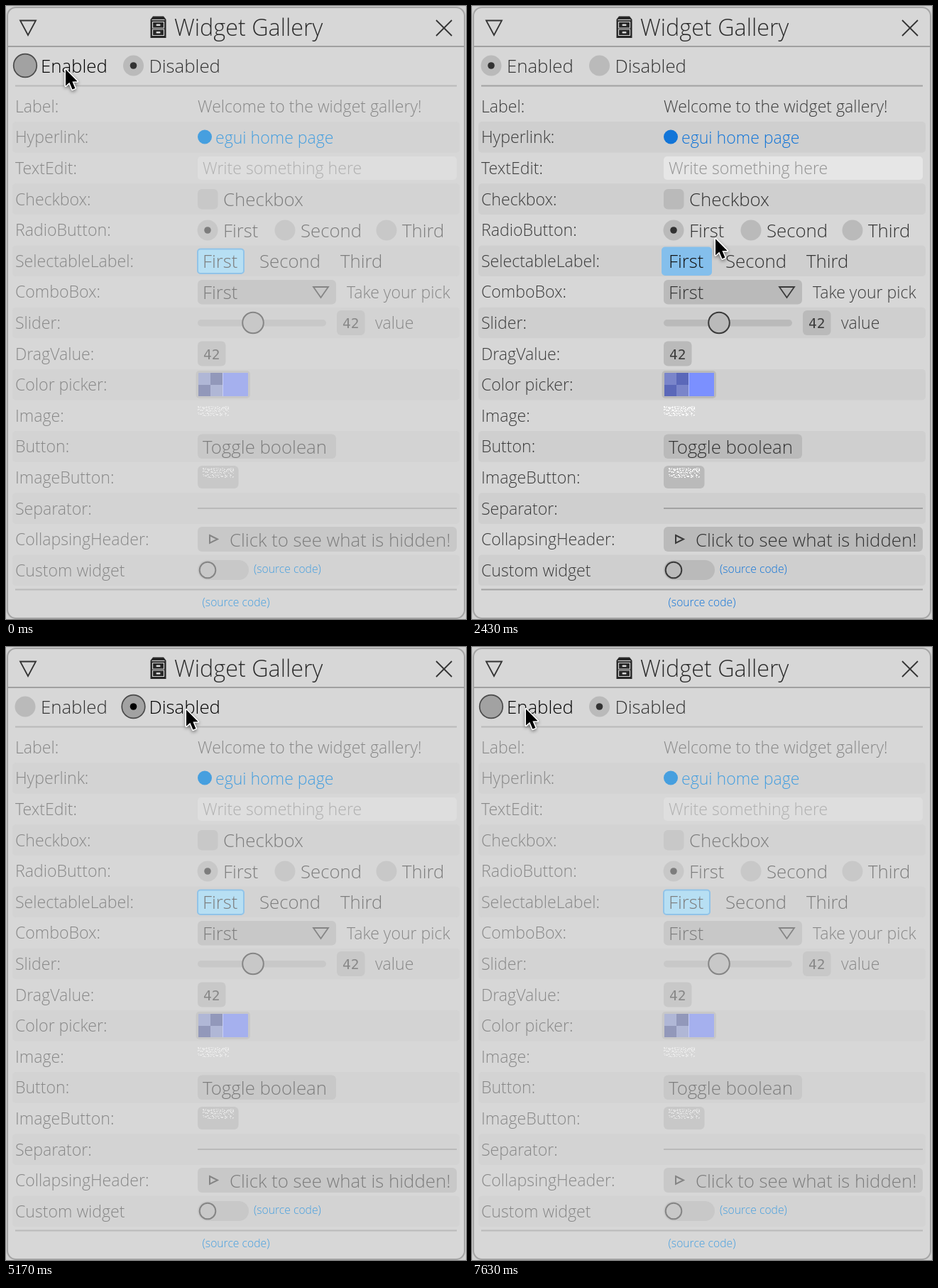
These frames come from a looping animation (648x864 px, 7830 ms). An HTML page with a canvas:

```html
<!DOCTYPE html>
<html lang="en">
<head>
<meta charset="utf-8">
<title>Widget Gallery</title>
<style>
  html, body { margin: 0; width: 100%; height: 100%; overflow: hidden; background: #d0d0d0; }
  canvas { display: block; width: 648px; height: 864px; }
</style>
</head>
<body>
<canvas id="stage" width="648" height="864"></canvas>
<script>
const ctx = document.getElementById('stage').getContext('2d');
const LOOP = 7830, HOVER_LAG = 50;
const ENABLE_AT = 700, DISABLE_AT = 4600, PRESS = 170;
const ROW_TOP = 119.5, ROW_H = 43.6;

const LABELS = ['Label', 'Hyperlink', 'TextEdit', 'Checkbox', 'RadioButton', 'SelectableLabel',
  'ComboBox', 'Slider', 'DragValue', 'Color picker', 'Image', 'Button', 'ImageButton',
  'Separator', 'CollapsingHeader'].map(s => s + ':').concat('Custom widget');

const THEMES = {
  on: { text: '#3c3c3c', strong: '#323232', hint: '#929292', link: '#1275d8', fill: '#bababa',
    stripe: '#cfcfcf', edit: '#e6e6e6', line: '#a2a2a2', stroke: '#3a3a3a',
    select: '#84bfec', selectLine: '#84bfec', dark: '#5b68b9', light: '#7a85ca', color: '#7b90ff', speck: 0.9 },
  off: { text: '#888', strong: '#7d7d7d', hint: '#b0b0b0', link: '#469fdf', fill: '#c8c8c8',
    stripe: '#d3d3d3', edit: '#dedede', line: '#bababa', stroke: '#858585',
    select: '#b7dff3', selectLine: '#91c3e8', dark: '#9298ba', light: '#b0b7d6', color: '#a5b0ee', speck: 0.5 }
};
const HOT = { fill: '#a2a2a2', stroke: '#4a4a4a', text: '#000' };

// time, x, y of the pointer tip
const PATH = [
  [0, 83, 88], [200, 87, 82], [700, 87, 82], [1000, 93, 120], [1250, 99, 180], [1490, 116, 245],
  [1530, 126, 258], [1750, 200, 340], [1970, 270, 392], [2150, 308, 400], [2300, 329, 380],
  [2430, 342, 327], [2750, 336, 240], [3070, 326, 177], [3200, 324, 152], [3500, 300, 115],
  [3850, 262, 92], [4200, 253, 87], [5170, 253, 87], [5400, 290, 130], [5700, 368, 174],
  [5950, 358, 260], [6230, 319, 351], [6450, 264, 375], [6650, 205, 350], [7000, 120, 235],
  [7300, 77, 112], [7420, 73, 90], [7630, 75, 86], [LOOP, 75, 86]
];

// Prefer a family that really has a light weight.
function pickFamily() {
  const width = font => { ctx.font = font; return ctx.measureText('Widget gallery demo').width; };
  return ['"Noto Sans"', '"Open Sans"'].find(f => width(`300 90px ${f}`) !== width(`400 90px ${f}`)) || '"Open Sans"';
}
const FAMILY = pickFamily();
const font = size => `340 ${size}px ${FAMILY}, sans-serif`;
const FONTS = { small: font(15.7), body: font(23.1), button: font(25.8), heading: font(32.3),
  mono: '19.5px "DejaVu Sans Mono", monospace' };
const DROP = { small: 5.5, body: 8.5, button: 9.5, heading: 11.5, mono: 7.5 };

let theme, pointer, enabled;

function slope(i, axis) {
  const a = PATH[i - 1], b = PATH[i], c = PATH[i + 1];
  if (!a || !c || (a[1] === b[1] && a[2] === b[2]) || (b[1] === c[1] && b[2] === c[2])) return 0;
  return (c[axis] - a[axis]) / (c[0] - a[0]);
}

function pointerAt(t) {
  t = (t + LOOP) % LOOP;
  const i = PATH.findIndex((p, n) => n + 1 < PATH.length && t < PATH[n + 1][0]);
  const a = PATH[i], b = PATH[i + 1], span = b[0] - a[0], u = (t - a[0]) / span;
  return [1, 2].map(k => {
    const m0 = slope(i, k) * span, m1 = slope(i + 1, k) * span;
    return a[k] + u * (m0 + u * (3 * (b[k] - a[k]) - 2 * m0 - m1 + u * (2 * (a[k] - b[k]) + m0 + m1)));
  });
}

const over = (x, y, w, h) =>
  pointer[0] > x - 7 && pointer[0] < x + w + 7 && pointer[1] > y - 3 && pointer[1] < y + h + 3;
const hot = (...rect) => enabled && over(...rect);

function paint(fill, stroke, width = 2) {
  if (fill) { ctx.fillStyle = fill; ctx.fill(); }
  if (stroke) { ctx.strokeStyle = stroke; ctx.lineWidth = width; ctx.stroke(); }
}
function rect(x, y, w, h, r, fill, stroke, width) {
  ctx.beginPath();
  ctx.roundRect(x, y, w, h, r);
  paint(fill, stroke, width);
}
function circle(x, y, r, fill, stroke, width) {
  ctx.beginPath();
  ctx.arc(x, y, r, 0, Math.PI * 2);
  paint(fill, stroke, width);
}
function poly(points, fill, stroke, width) {
  ctx.beginPath();
  points.forEach(([x, y]) => ctx.lineTo(x, y));
  ctx.closePath();
  paint(fill, stroke, width);
}
function line(x1, y1, x2, y2, color, width = 2) {
  ctx.beginPath();
  ctx.moveTo(x1, y1);
  ctx.lineTo(x2, y2);
  paint(null, color, width);
}
function text(s, x, y, style, color, align = 'left') {
  ctx.font = FONTS[style];
  ctx.textAlign = align;
  ctx.fillStyle = color;
  ctx.fillText(s, x, y + DROP[style]);
}

function box(x, y, w, h, isHot) {
  if (isHot) rect(x - 1, y - 1, w + 2, h + 2, 7, HOT.fill, HOT.stroke);
  else rect(x, y, w, h, 6, theme.fill);
}

function radio(x, y, label, colors, selected, isHot, pressed) {
  if (pressed) circle(x, y, 18, '#8e8e8e', '#222');
  else if (isHot) circle(x, y, 16.3, HOT.fill, HOT.stroke, 1.7);
  else circle(x, y, 14.5, colors.fill);
  if (selected) circle(x, y, 4.8, isHot ? HOT.text : colors.strong);
  text(label, x + 22, y, 'button', isHot ? HOT.text : colors.strong);
}

function cabinet() {
  const ink = '#262626', paper = '#d7d7d7';
  poly([[207, 14.5], [222, 14.5], [225.5, 19], [225.5, 45], [203.5, 45], [203.5, 19]], ink);
  line(205.5, 19.5, 223.5, 19.5, paper, 1.2);
  for (const y of [22.5, 33]) {
    rect(206.5, y, 16, 8.5, 0, null, paper, 1.2);
    rect(211.5, y + 3, 6, 2.6, 1, paper);
  }
}

function windowFrame() {
  ctx.fillStyle = '#d0d0d0';
  ctx.fillRect(0, 0, 648, 864);
  rect(2, 2, 644, 861, 12, '#d7d7d7', '#a5a5a5');
  line(2, 57, 646, 57, '#a0a0a0');
  poly([[20, 20.5], [42, 20.5], [31, 41]], null, '#333', 1.8);
  line(606, 20, 628, 42, '#333', 1.8);
  line(628, 20, 606, 42, '#333', 1.8);
  cabinet();
  text('Widget Gallery', 237, 30, 'heading', '#2c2c2c');
}

// Tiny white pixel scribble, the same on each call.
function scribble(x, y) {
  let seed = 17;
  const random = () => (seed = seed * 16807 % 2147483647) / 2147483647;
  ctx.fillStyle = `rgba(255,255,255,${theme.speck})`;
  for (let row = 0; row < 14; row++)
    for (let col = 0; col < 44; col++)
      if (random() < (row < 8 ? 0.38 : 0.3) && row !== 8) ctx.fillRect(x + col, y + row, 1, 1);
}

function link(s, x, y, style, underline) {
  text(s, x, y, style, theme.link);
  if (underline) line(x, y + 12, x + ctx.measureText(s).width, y + 12, theme.link, 1.5);
}

function topRadios(t) {
  const pressing = at => t >= at - PRESS && t < at;
  radio(27, 84, 'Enabled', THEMES.on, enabled, over(12, 69, 131, 30), pressing(ENABLE_AT));
  radio(179.5, 84, 'Disabled', THEMES.on, !enabled, over(165, 69, 137, 30), pressing(DISABLE_AT));
  line(13, 112.5, 635, 112.5, theme.line);
}

function labels() {
  LABELS.forEach((label, i) => {
    if (i % 2) rect(9, ROW_TOP + i * ROW_H, 630, ROW_H, 5, theme.stripe);
    text(label, 13, ROW_TOP + (i + 0.5) * ROW_H, 'body', theme.text);
  });
}

function selectable() {
  const isHot = hot(270, 342, 65, 36);
  const grow = isHot ? 2 : enabled ? 1 : 0;
  rect(270 - grow, 342.5 - grow, 65 + 2 * grow, 34.5 + 2 * grow, 4, theme.select, theme.selectLine);
  text('First', 277, 359.5, 'button', isHot ? '#111' : theme.strong);
  text('Second', 357, 359.5, 'button', theme.strong);
  text('Third', 471, 359.5, 'button', theme.strong);
}

function inputs() {
  text('Welcome to the widget gallery!', 270, 141, 'body', theme.text);
  circle(280, 184.5, 10, theme.link);
  link('egui home page', 295, 185, 'body', hot(270, 174, 189, 22));

  rect(270, 212, 365, 33, 5, theme.edit, hot(270, 212, 365, 33) ? HOT.stroke : null);
  text('Write something here', 277, 228.5, 'body', theme.hint);

  const check = hot(270, 258, 148, 28);
  box(270, 258, 28.5, 28.5, check);
  text('Checkbox', 306, 272.5, 'button', check ? HOT.text : theme.strong);

  radio(284, 316, 'First', theme, true, hot(270, 302, 87, 28));
  radio(393, 316, 'Second', theme, false, hot(379, 302, 120, 28));
  radio(536, 316, 'Third', theme, false, hot(522, 302, 96, 28));
  selectable();

  const combo = hot(270, 386, 195, 34);
  box(270, 386, 195, 34.5, combo);
  text('First', 277, 403, 'button', combo ? HOT.text : theme.strong);
  poly([[433, 396], [454, 396], [443.5, 411]], null, combo ? HOT.text : theme.stroke, 1.8);
  text('Take your pick', 480, 403, 'body', theme.text);
}

function controls() {
  rect(270, 442, 181, 9.5, 4.7, theme.fill);
  circle(348, 446.5, 14.8, theme.fill, theme.stroke);
  box(466, 429, 39.5, 35);
  text('42', 485.7, 446, 'mono', theme.text, 'center');
  text('value', 520, 446, 'body', theme.text);
  box(270, 472.5, 39.5, 35);
  text('42', 289.7, 490, 'mono', theme.text, 'center');

  rect(267.5, 514, 76.5, 39, 5, theme.fill);
  rect(271, 517, 70, 33, 1, theme.light);
  rect(288, 517, 17, 17, 0, theme.dark);
  rect(271, 534, 17, 16, 0, theme.dark);
  rect(305, 517, 36, 33, 1, theme.color);
  line(305.5, 517, 305.5, 550, 'rgba(255,255,255,.4)', 1);

  scribble(270, 564);
  box(270, 603.5, 195, 34.5);
  text('Toggle boolean', 277, 621, 'button', theme.strong);
  box(270, 648, 57.5, 32);
  scribble(277, 651);
  line(270, 708, 635, 708, theme.line);

  box(270, 734, 365, 35);
  poly([[287, 746], [298, 751.5], [287, 757]], null, theme.stroke);
  text('Click to see what is hidden!', 315, 752, 'button', theme.strong);

  rect(270, 781, 72, 28, 14, theme.fill);
  circle(284, 795, 11.3, theme.fill, theme.stroke);
  link('(source code)', 349, 793, 'small');
  line(13, 822.5, 635, 822.5, theme.line);
  text('(source code)', 324, 840, 'small', theme.link, 'center');
}

function cursor([x, y]) {
  const arrow = [[0, 0], [0, 25], [5.8, 19.8], [10.3, 30.5], [14.6, 28.7], [10.2, 18.4], [18, 18.2]];
  ctx.save();
  ctx.translate(x + 1, y + 1.5);
  ctx.scale(0.92, 0.92);
  ctx.lineJoin = 'round';
  ctx.shadowColor = 'rgba(0,0,0,.35)';
  ctx.shadowBlur = 5;
  ctx.shadowOffsetY = 2;
  poly(arrow, '#fff', '#fff', 3.4);
  ctx.shadowColor = 'transparent';
  poly(arrow, '#000');
  ctx.restore();
}

function draw(t) {
  enabled = t >= ENABLE_AT && t < DISABLE_AT;
  theme = enabled ? THEMES.on : THEMES.off;
  pointer = pointerAt(t - HOVER_LAG);
  windowFrame();
  topRadios(t);
  labels();
  inputs();
  controls();
  cursor(pointerAt(t));
}

const start = performance.now();
function tick() {
  draw((performance.now() - start) % LOOP);
  requestAnimationFrame(tick);
}
tick();
</script>
</body>
</html>
```
